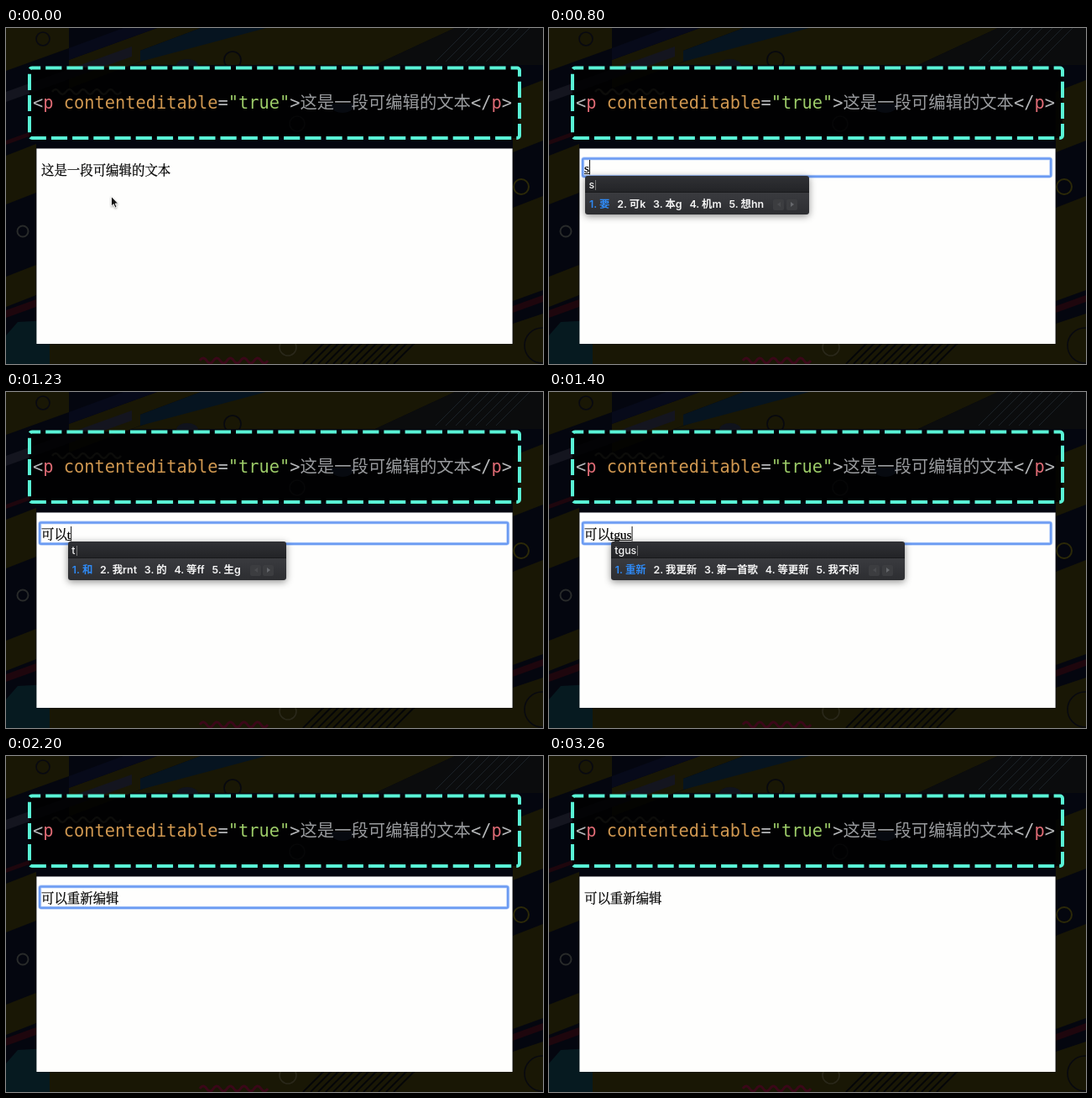
An HTML page that plays this animation: 640x400 px, repeating every 4800 ms.

```html
<!DOCTYPE html>
<html lang="zh-CN">
<head>
<meta charset="utf-8">
<title>contenteditable</title>
<style>
  html, body { margin: 0; width: 100%; height: 100%; overflow: hidden; background: #04060f; }
  svg { position: absolute; left: 0; top: 0; }
  .code { font: 20.35px "DejaVu Sans Mono", "Noto Sans CJK SC", "Noto Sans CJK", monospace; white-space: pre; fill: #b4b6b8; }
  .edit { font: 15.43px "Liberation Serif", "Noto Serif CJK SC", "Noto Sans CJK SC", "Noto Sans CJK", serif; fill: #000; stroke: #000; stroke-width: .25px; }
  #arrow { filter: drop-shadow(0 1px 1px rgba(0, 0, 0, .35)); }
  #ime {
    position: absolute; height: 46px; border-radius: 3px; white-space: pre;
    font: 600 12.4px Inter, "Noto Sans CJK SC", "Noto Sans CJK", sans-serif; color: #f4f4f4;
    background: linear-gradient(#303135, #232427 19px, #18191b 19px, #18191b 20px, #3a3b3f 20px, #2d2e31);
    box-shadow: 0 2px 8px rgba(0, 0, 0, .45);
  }
  #typed { height: 20px; line-height: 21px; padding-left: 4.5px; font-weight: 500; }
  #typed::after { content: ""; display: inline-block; width: 1px; height: 12px; margin-left: 1px; background: #777; vertical-align: -2px; }
  #list { display: flex; height: 26px; line-height: 28px; padding: 0 14.5px 0 5px; }
  #list span { margin-right: 8.8px; }
  #list span:first-child { color: #2f8af5; }
  #list i { width: 13px; height: 13px; margin: 7.5px 0 0 2.5px; border-radius: 2px; background: #3c3d40; position: relative; }
  #list i::after { content: ""; position: absolute; left: 5px; top: 3.5px; border: 3px solid transparent; border-left: 4px solid #66686c; border-right: 0; }
  #list i.prev::after { transform: scaleX(-1); border-left-color: #4a4b4e; }
</style>
</head>
<body>
<svg width="640" height="400" viewBox="0 0 640 400">
  <rect width="640" height="400" fill="#04060f"/>
  <path d="M0 0H75V24L0 51zM75 38L180 0H232L160 27V40L75 72zM270 0H535L440 44H150zM0 152L36 138V196L0 210zM0 296L36 282V318L0 332zM52 376H640V400H52zM604 76L640 62V134L604 148zM604 214L640 200V312L604 325zM604 352L640 340V400H604z" fill="#191705"/>
  <path d="M535 0H640V44H440z" fill="#0b0c0d"/>
  <path d="M75 24L140 0H180L75 38z" fill="#070a1a"/>
  <path d="M160 27L232 0H310L160 40z" fill="#061420"/>
  <path d="M0 76L150 22V34L0 88z" fill="#14151f"/>
  <path d="M0 336L36 323V332L0 345zM604 331L640 318V326L604 339zM0 134L36 121V126L0 139z" fill="#1e060d"/>
  <path d="M0 366L14 350L52 348V400H0z" fill="#061a20"/>
  <path id="hatch" fill="none" stroke="#040508" stroke-width="1.8"/>
  <path id="rays" fill="none" stroke="#1b2228" stroke-width="1"/>
  <g fill="none" stroke-width="1.6">
    <circle cx="44" cy="13" r="8" stroke="#080911"/>
    <circle cx="270" cy="38" r="10" stroke="#07080f"/>
    <circle cx="614" cy="189" r="9" stroke="#2c2908" stroke-width="2"/>
    <circle cx="20" cy="242" r="6.5" stroke="#282a2a" stroke-width="2"/>
    <circle cx="336" cy="380" r="10" stroke="#2a281a"/>
    <circle cx="639" cy="378" r="21" stroke="#08090f"/>
    <circle cx="347" cy="114" r="9" stroke="#26272a"/>
  </g>
  <path d="M203 45A13 8 0 0 1 229 45z" fill="#10131c"/>
  <path id="redWave" fill="none" stroke="#3a0718" stroke-width="3"/>

  <rect x="28" y="47" width="584" height="84" rx="3" fill="#000" fill-opacity=".84"/>
  <path id="darkWave" fill="none" stroke="#0c0c0a" stroke-width="2.5"/>
  <path d="M386 90A15 11 0 0 0 416 90z" fill="#070a10"/>
  <rect x="28" y="47.5" width="584" height="83.5" rx="3" fill="none" stroke="#59f3d6" stroke-width="4" stroke-dasharray="19.2 6" stroke-dashoffset="9"/>
  <text class="code" x="32" y="95.5">&lt;<tspan fill="#df6b75">p</tspan> <tspan fill="#cf9750">contenteditable</tspan>=<tspan fill="#9ccb68">"true"</tspan>&gt;<tspan fill="#999b9e">这是一段可编辑的文本</tspan>&lt;/<tspan fill="#df6b75">p</tspan>&gt;</text>

  <rect x="36.4" y="143.5" width="567.2" height="232.5" fill="#fefefd"/>
  <g id="ring" fill="none">
    <rect x="40.2" y="155.4" width="558" rx="2" stroke="#a9c6fb" stroke-width="4.2" stroke-opacity=".6"/>
    <rect x="40.2" y="155.4" width="558" rx="1.5" stroke="#6b9bf2" stroke-width="2.5"/>
  </g>
  <rect id="sel" y="160" height="17.5" fill="#b4d5fb"/>
  <text id="text" class="edit" x="42"><tspan id="done"></tspan><tspan id="comp"></tspan></text>
  <path id="under" stroke="#111" stroke-width="1"/>
  <path id="caret" stroke="#111" stroke-width="1"/>
  <path id="arrow" d="M0 0V11.6L2.7 9.2L4.6 13.6L6.6 12.7L4.7 8.5H8.2z" fill="#111" stroke="#fff" stroke-width=".9"/>
  <path id="beam" d="M-2.5 -6Q0 -6 0 -4.5Q0 -6 2.5 -6M0 -4.5V4.5M-2.5 6Q0 6 0 4.5Q0 6 2.5 6M-1.5 2H1.5" fill="none" stroke="#222" stroke-width="1"/>
</svg>
<div id="ime"><div id="typed"></div><div id="list"></div></div>

<script>
const $ = id => document.getElementById(id);
const LOOP = 4800, LEFT = 42, EM = 15.43;

// time, committed text, composing keys, candidates
const edits = [
  [0, "这是一段可编辑的文本"],
  [730, "", "s", "要 可k 本g 机m 想hn"],
  [830, "", "sk", "可 哥sk 歌sw 可以 樱"],
  [930, "", "skn", "可以y 可忙 可心 歌尽 可惜"],
  [1030, "", "skny", "可以 可忙 可心 歌尽 本中心"],
  [1100, "可以"],
  [1230, "可以", "t", "和 我rnt 的 等ff 生g"],
  [1300, "可以", "tg", "生 等更 重j 我不 第一"],
  [1350, "可以", "tgu", "重新s 我更 生意 等闲 我不闲"],
  [1400, "可以", "tgus", "重新 我更新 第一首歌 等更新 我不闲"],
  [1600, "可以重新"],
  [1700, "可以重新", "x", "经 给wgk 张tay 红ag 比xn"],
  [1760, "可以重新", "xy", "编na 统cq 纺n 绩 弦x"],
  [1900, "可以重新", "xyl", "编辑k 编辑部 编辑器 编辑 统一"],
  [1960, "可以重新", "xylk", "编辑 编辑部 编辑器 编辑人员 编辑工作室"],
  [2200, "可以重新编辑"]
];

// start, end, steps, from, to
const moves = [
  [30, 227, 7, [125.5, 200.5], [167, 163]],
  [2230, 2366, 5, [167, 163], [187.5, 283.5]],
  [2630, 2700, 3, [187.5, 283.5], [130.5, 273.5]],
  [3060, 3210, 4, [130.5, 273.5], [58.5, 248.5]]
];

const between = (t, a, b) => t >= a && t < b;
const show = (el, on) => { el.style.display = on ? "" : "none"; };

function stepped(t, a, b, n) {
  if (t < a) return 0;
  if (t >= b) return 1;
  return (Math.floor((t - a) / (b - a) * (n - 1)) + 1) / n;
}

function pointer(t) {
  const [a, b, n, p, q] = moves.filter(m => t >= m[0]).pop() || moves[0];
  const k = stepped(t, a, b, n);
  return p.map((v, i) => v + (q[i] - v) * k);
}

function wave(x, y, len, count, amp) {
  const w = len / count;
  let d = `M${x} ${y}q${w / 4} ${-amp} ${w / 2} 0`;
  for (let i = 1; i < count * 2; i++) d += `t${w / 2} 0`;
  return d;
}

function lines(count, x, y, gap, dx, dy) {
  let d = "";
  for (let i = 0; i < count; i++) d += `M${x + i * gap} ${y}l${dx} ${dy}`;
  return d;
}

let shown;
function setEdit(e) {
  if (e === shown) return;
  shown = e;
  const [, done, keys = "", words] = e;
  const base = done ? 174.5 : 171.5;
  const start = LEFT + done.length * EM;
  $("done").textContent = done;
  $("comp").textContent = keys;
  $("text").setAttribute("y", base);
  const end = LEFT + $("text").getComputedTextLength();
  $("under").setAttribute("d", keys ? `M${start} ${base + 2}H${end}` : "");
  $("caret").setAttribute("d", `M${end + .5} ${base - 14.5}v17.5`);
  for (const r of $("ring").children) r.setAttribute("height", done ? 25.4 : 21.4);
  show($("ime"), keys);
  if (!keys) return;
  $("ime").style.left = start + 1 + "px";
  $("ime").style.top = (done ? 178 : 176) + "px";
  $("typed").textContent = keys;
  $("list").innerHTML = words.split(" ").map((w, i) => `<span>${i + 1}. ${w}</span>`).join("")
    + '<i class="prev"></i><i></i>';
}

function draw(t) {
  setEdit(edits.filter(e => t >= e[0]).pop());
  show($("ring"), between(t, 260, 2400));
  show($("caret"), between(t, 730, 2200));

  const from = t < 480 ? 8 : 0;
  show($("sel"), between(t, 400, 730));
  $("sel").setAttribute("x", LEFT + from * EM);
  $("sel").setAttribute("width", (10 - from) * EM);

  const [x, y] = pointer(t);
  const visible = t < 730 || between(t, 2230, 3260);
  const overText = y < 181;
  for (const [id, on] of [["beam", overText], ["arrow", !overText]]) {
    show($(id), visible && on);
    $(id).setAttribute("transform", `translate(${x} ${y})`);
  }
}

$("redWave").setAttribute("d", wave(231, 396, 81, 5, 6));
$("darkWave").setAttribute("d", wave(55, 76, 82, 5, 6));
$("hatch").setAttribute("d", lines(13, 354, 400, 9, 26, -26));
$("rays").setAttribute("d", lines(7, 512, 40, 12, 42, -42));

const t0 = performance.now();
function frame() {
  draw((performance.now() - t0) % LOOP);
  requestAnimationFrame(frame);
}
draw(0);
requestAnimationFrame(frame);
</script>
</body>
</html>
```
